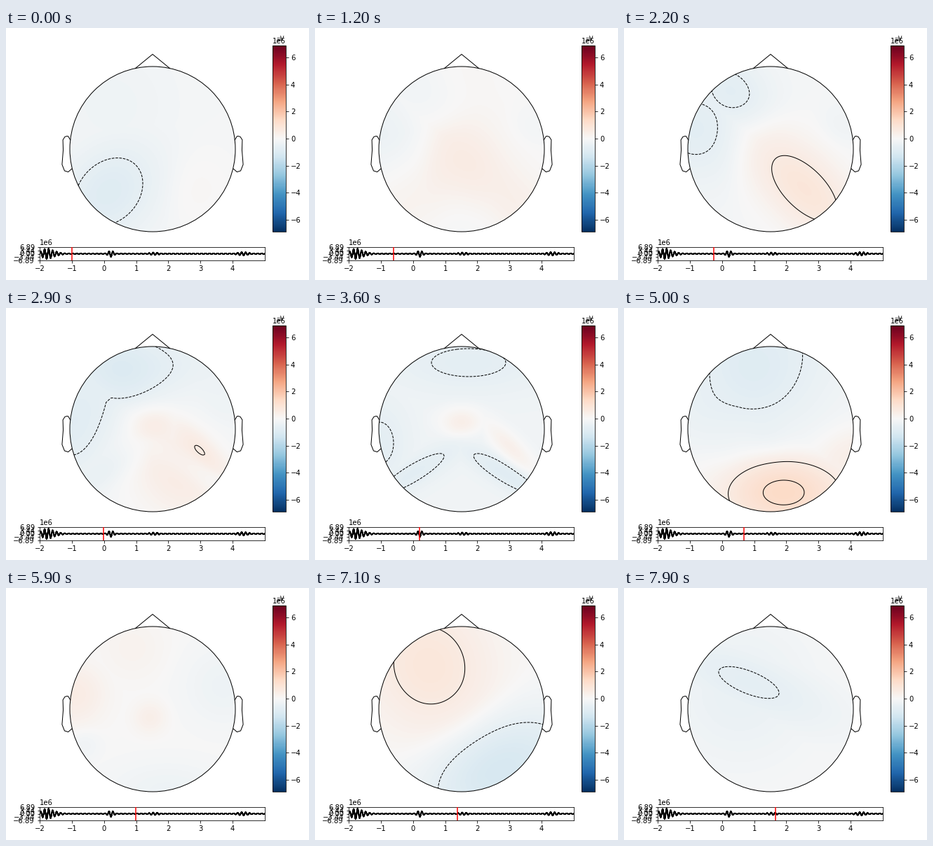
A matplotlib script for the animation above (8000 ms loop, 432 px wide and 360 px high).

```python
import numpy as np
import matplotlib.pyplot as plt
from matplotlib.animation import FuncAnimation
from matplotlib.patches import Circle

plt.rcParams["font.family"] = "DejaVu Sans"
plt.rcParams["font.size"] = 10

W, H, DPI = 432, 360, 72
FRAMES, INTERVAL = 80, 100
CX, CY, R = 209, 173, 118
VMAX, STEP = 6.89, 0.6
LEVELS = STEP * np.array([k for k in range(-11, 12) if k])

GX, GY = np.meshgrid(np.arange(CX - R, CX + R + 1, 2.0),
                     np.arange(CY - R, CY + R + 1, 2.0))


def lobe(base, x, y, peak, a, b=None, angle=0):
    """Elliptic hill over base; a strong one has its first iso-line at a, b."""
    c, s = np.cos(np.radians(angle)), np.sin(np.radians(angle))
    dx, dy = GX - x, GY - y
    q = ((c * dx + s * dy) / a) ** 2 + ((c * dy - s * dx) / (b or a)) ** 2
    rise = peak - base
    edge = np.copysign(STEP, peak) - base
    k = np.log(rise / edge) if abs(peak) > STEP else 1
    return rise * np.exp(-k * q)


def potential_map(base, *lobes):
    """Strongest lobe of each sign; the larger of the two dominates."""
    hills = [lobe(base, *args) for args in lobes]
    p = np.maximum(0, np.max(hills, axis=0))
    n = np.maximum(0, -np.min(hills, axis=0))
    return base + (p ** 3 - n ** 3) / (p ** 2 + n ** 2 + 1e-9)


# Each lobe: x, y, peak, half-axes, tilt
MAPS = {
    0: potential_map(
        -.1, (147, 234, -.85, 54, 42, -45), (150, 110, -.3, 90),
        (270, 230, .08, 60)),
    22: potential_map(
        -.1, (257, 229, .82, 60, 29, 45), (153, 92, -.72, 33, 25, 45),
        (104, 144, -.72, 37), (310, 140, -.25, 35)),
    36: potential_map(
        -.25, (219, 78, -.68, 53, 20), (92, 193, -.68, 20, 30),
        (140, 236, -.72, 51, 12, -31), (272, 237, -.78, 53, 12, 31),
        (209, 163, .4, 32, 22), (278, 198, .35, 55, 17, 45)),
    43: potential_map(
        0, (197, 60, -.98, 112, 121), (228, 262, 1.65, 97, 52),
        (330, 212, .7, 27, 20)),
    59: potential_map(
        0, (98, 152, .55, 45), (205, 185, .4, 25), (180, 85, .25, 50),
        (310, 140, -.35, 60), (230, 290, -.35, 90, 45), (112, 225, -.25, 25)),
    71: potential_map(
        0, (163, 111, .8, 56, 50, 70), (265, 260, -1.12, 97, 58, -28)),
    79: potential_map(
        0, (178, 135, -.66, 46, 16, 22), (165, 150, -.48, 110)),
}
KEYS = list(MAPS)

SWING = lobe(0, 225, 255, 0.59, 75) * 1.4 + lobe(0, 180, 95, -0.59, 75)
OMEGA = 2 * np.pi * 0.3


def clock(n):
    return -1 + 0.0336 * n


def potential(n):
    """Alpha waves that fade from one map to the next."""
    k = min(np.searchsorted(KEYS, n, side="right") - 1, len(KEYS) - 2)
    a, b = KEYS[k], KEYS[k + 1]
    u = (n - a) / (b - a)
    burst = 0.6 + 1.2 * np.exp(-((clock(n) - 0.22) / 0.15) ** 2)
    return (np.cos(np.pi * u / 2) * np.cos(OMEGA * (n - a)) * MAPS[a]
            + np.sin(np.pi * u / 2) * np.cos(OMEGA * (b - n)) * MAPS[b]
            + np.sin(np.pi * u) * np.sin(OMEGA * (n - a)) * burst * SWING)


def pixel_axes(x0, y0, x1, y1):
    return fig.add_axes([x0 / W, 1 - y1 / H, (x1 - x0) / W, (y1 - y0) / H])


def fix_stage():
    stage.set_xlim(0, W)
    stage.set_ylim(H, 0)


fig = plt.figure(figsize=(W / DPI, H / DPI), dpi=DPI, facecolor="white")

# Head
stage = pixel_axes(0, 0, W, H)
stage.axis("off")
image = stage.imshow(MAPS[0], cmap="RdBu_r", vmin=-VMAX, vmax=VMAX,
                     extent=(CX - R - 1, CX + R + 1, CY + R + 1, CY - R - 1),
                     aspect="auto", interpolation="bilinear")
head = Circle((CX, CY), R, fill=False, ec="k", lw=1, zorder=5)
stage.add_patch(head)
image.set_clip_path(head)
stage.plot([CX - 24.5, CX, CX + 24.5], [57.6, 37.5, 57.6], "k", lw=1)
ear_x = np.array([.497, .510, .518, .5299, .5419, .54, .547, .532, .510, .489])
ear_y = np.array([.0555, .0775, .0783, .0746, .0555,
                  -.0055, -.0932, -.1313, -.1384, -.1199])
for side in (-1, 1):
    stage.plot(CX + side * 2 * R * ear_x, CY - 2 * R * ear_y, "k", lw=1)
fix_stage()

# Colour scale
scale = pixel_axes(380, 25, 399, 291)
fig.colorbar(image, cax=scale, ticks=range(-6, 7, 2))
stage.text(380, 22, "1e6")
stage.text(391.5, 18, "µV", fontsize=8, ha="center")

# Signal strip
strip = pixel_axes(48, 313, 369, 332)
rng = np.random.default_rng(4)
t = np.linspace(-2, 5, 1600)
env = 0.4 + sum(h * np.exp(-((t - c) / s) ** 2) for h, c, s in
                [(5.6, -1.7, .25), (2.4, .22, .12), (.8, 1.55, .2), (1.2, 4.3, .25)])
env *= 1 + 0.25 * np.sin(9 * t)
for _ in range(8):
    gain, phase = rng.uniform(0.3, 1), rng.normal(0, 0.15)
    strip.plot(t, gain * env * np.sin(2 * np.pi * 8 * t + phase), "k", lw=1.5)
cursor = strip.axvline(clock(0), color="r", lw=1.5, zorder=4)
strip.set_xlim(-2, 5)
strip.set_ylim(-VMAX, VMAX)
strip.set_xticks(range(-2, 5))
marks = np.linspace(-VMAX, VMAX, 5)
strip.set_yticks(marks, [f"{m:.2f}".replace("-", "\u2212") for m in marks])
stage.text(48, 310, "1e6")

contours = []


def draw(n):
    z = potential(n)
    image.set_data(z)
    while contours:
        contours.pop().remove()
    inside = LEVELS[(LEVELS > z.min()) & (LEVELS < z.max())]
    if len(inside):
        lines = stage.contour(GX, GY, z, levels=inside, colors="k", linewidths=1)
        lines.set_clip_path(head)
        contours.append(lines)
        fix_stage()
    cursor.set_xdata([clock(n)] * 2)
    return []


anim = FuncAnimation(fig, draw, frames=FRAMES, interval=INTERVAL,
                     init_func=lambda: draw(0), repeat=True, repeat_delay=0)
plt.show()
```
